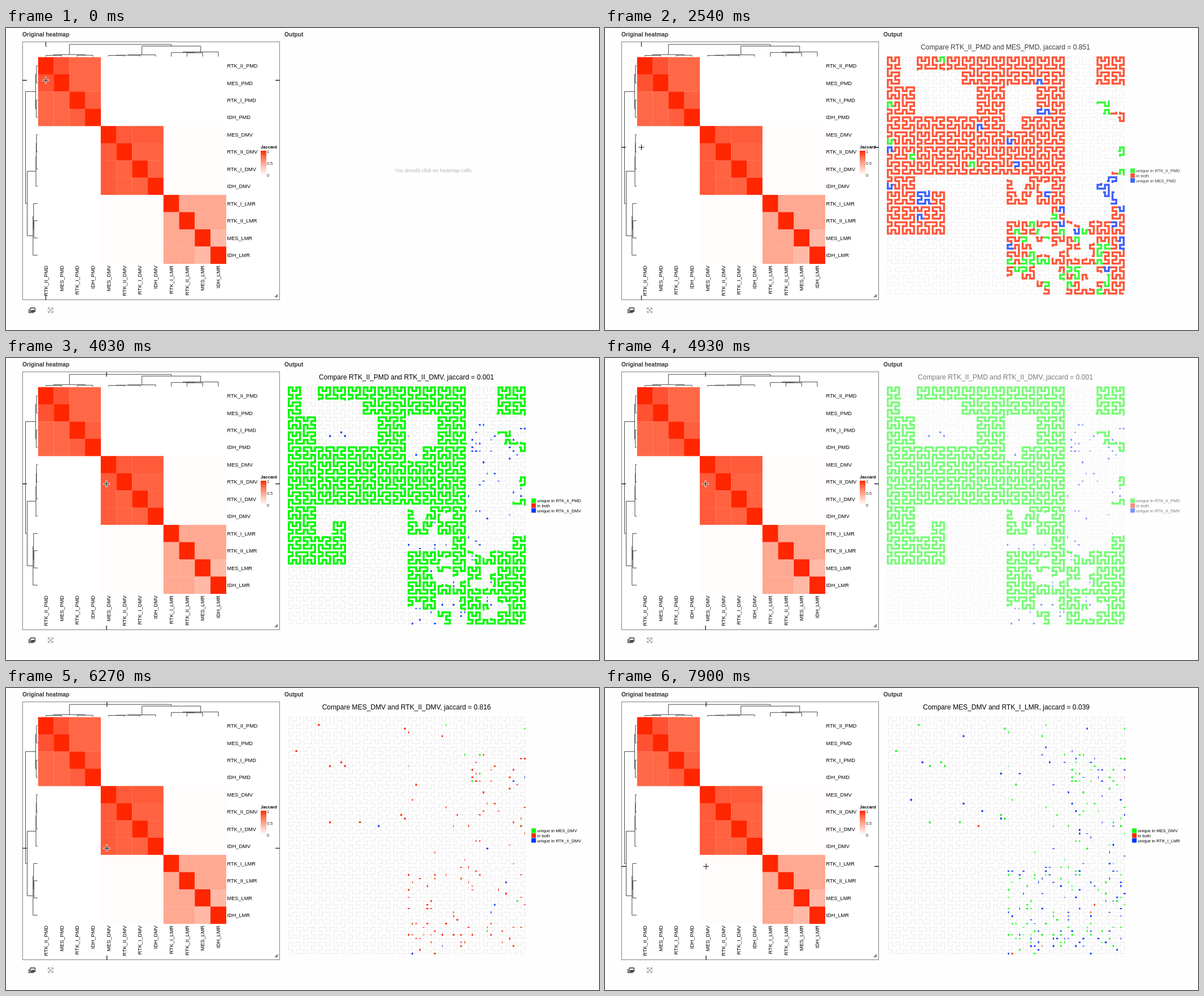
These frames come from a looping animation (1050x534 px, 8 s). An HTML page:

```html
<!DOCTYPE html>
<html lang="en">
<head>
<meta charset="utf-8">
<title>Heatmap and Hilbert curve</title>
<style>
  html, body { margin: 0; width: 100%; height: 100%; overflow: hidden; background: #fefefe; }
  svg { display: block; width: 1050px; height: 534px; }
  text { font-family: "Liberation Sans", Arial, Helvetica, sans-serif; }
</style>
</head>
<body>
<svg id="stage" viewBox="0 0 1050 534" xmlns="http://www.w3.org/2000/svg"></svg>
<script>
const RED = '#ff2600', GREEN = '#00f900', BLUE = '#0433ff';
const LOOP = 8000;
const stage = document.getElementById('stage');

function add(parent, tag, attrs, content) {
  const el = document.createElementNS('http://www.w3.org/2000/svg', tag);
  for (const k in attrs) el.setAttribute(k, attrs[k]);
  if (content !== undefined) el.textContent = content;
  parent.appendChild(el);
  return el;
}
const text = (parent, x, y, size, str, more) =>
  add(parent, 'text', { x, y, 'font-size': size, ...more }, str);
const rect = (parent, x, y, width, height, fill, more) =>
  add(parent, 'rect', { x, y, width, height, fill, ...more });
const line = (parent, d, stroke, width, more) =>
  add(parent, 'path', { d, fill: 'none', stroke, 'stroke-width': width, ...more });
const random = (n, seed) => {
  const v = Math.sin(n * 12.9898 + seed * 78.233) * 43758.5453;
  return v - Math.floor(v);
};

// ---- Heatmap panel ----
const X0 = 56.8, Y0 = 51.5, CW = 27.75, CH = 30.45;
const names = ['RTK_II_PMD', 'MES_PMD', 'RTK_I_PMD', 'IDH_PMD',
  'MES_DMV', 'RTK_II_DMV', 'RTK_I_DMV', 'IDH_DMV',
  'RTK_I_LMR', 'RTK_II_LMR', 'MES_LMR', 'IDH_LMR'];

function cellColor(i, j) {
  const bi = i >> 2, bj = j >> 2;
  if (i === j) return RED;
  if (bi !== bj) return bi && bj ? '#fffcfb' : null;
  const lo = Math.min(i, j) % 4, hi = Math.max(i, j) % 4;
  if (bi === 0) return hi === 1 ? '#ff5233' : lo === 2 ? '#ff5f3e' : '#ff6846';
  if (bi === 1) return lo === 0 ? '#ff5a39' : '#ff6341';
  return lo === 2 ? '#ffb9a6' : '#ffa892';
}

// A node is [left, right, height]; leaves are row numbers.
const tree = [
  [[0, 1, 2], [2, 3, 2.3], 3.5],
  [[[[4, 5, 2], 6, 2.4], 7, 3], [[8, [9, 10, 6.6], 7.2], 11, 8.2], 18.5],
  21.5
];
function branches(node, at, out) {
  if (typeof node === 'number') return { p: node, h: 0 };
  const a = branches(node[0], at, out), b = branches(node[1], at, out), h = node[2];
  out.push('M' + at(a.p, a.h) + 'L' + at(a.p, h) + 'L' + at(b.p, h) + 'L' + at(b.p, b.h));
  return { p: (a.p + b.p) / 2, h };
}
function dendrogram(at) {
  const out = [];
  branches(tree, at, out);
  line(stage, out.join(''), '#333', 0.9);
}

function drawHeatmap() {
  text(stage, 29, 15, 10.2, 'Original heatmap', { 'font-weight': 700, fill: '#333' });
  text(stage, 493, 15, 10.2, 'Output', { 'font-weight': 700, fill: '#333' });
  rect(stage, 29.5, 24.5, 455, 456, '#fff', { stroke: '#808080' });
  for (let i = 0; i < 12; i++)
    for (let j = 0; j < 12; j++) {
      const c = cellColor(i, j);
      if (c) rect(stage, X0 + j * CW, Y0 + i * CH, CW + 0.2, CH + 0.2, c);
    }
  names.forEach((name, i) => {
    text(stage, 391.5, Y0 + (i + 0.5) * CH + 3.4, 9.2, name);
    const x = X0 + (i + 0.5) * CW + 3.3;
    text(stage, x, 420, 9.2, name, { 'text-anchor': 'end', transform: `rotate(-90 ${x} 420)` });
  });
  dendrogram((p, h) => `${X0 + (p + 0.5) * CW} ${50.5 - h}`);
  dendrogram((p, h) => `${56 - h} ${Y0 + (p + 0.5) * CH}`);

  const grad = add(add(stage, 'defs', {}), 'linearGradient', { id: 'scale', x1: 0, y1: 0, x2: 0, y2: 1 });
  [RED, '#ff6e4d', '#ffa48d', '#ffd3c7', '#fff'].forEach((c, i) =>
    add(grad, 'stop', { offset: i / 4, 'stop-color': c }));
  text(stage, 451, 212.7, 7.6, 'Jaccard', { 'font-weight': 700 });
  rect(stage, 451, 217, 10, 43.5, 'url(#scale)');
  ['1', '0.5', '0'].forEach((s, i) => text(stage, 462, 221 + i * 21, 7.3, s, { fill: '#222' }));
}

function drawTools() {
  add(stage, 'path', { d: 'M481 470V476H475Z', fill: '#808080' });
  rect(stage, 43, 495, 8.5, 6.5, '#fff', { stroke: '#333', 'stroke-width': 1.3, rx: 0.8 });
  line(stage, 'M40.7 497V503.3H49.5', '#333', 1.3);
  add(stage, 'path', { d: 'M43.8 501L46 498L47.5 499.5L49 497.5L51 501Z', fill: '#333' });
  line(stage, 'M75.5 495.5L82.5 502.5M82.5 495.5L75.5 502.5M74.8 498V494.8H78M80 494.8H83.2V498' +
    'M83.2 500V503.2H80M78 503.2H74.8V500', '#888', 1);
}

// ---- Hilbert curve ----
const N = 64, STEP = 6.63, CX = 500.8, CY = 51.9;
function hilbert(d) {
  let x = 0, y = 0;
  for (let s = 1, t = d; s < N; s *= 2, t >>= 2) {
    const rx = 1 & (t >> 1), ry = 1 & (t ^ rx);
    if (!ry) {
      if (rx) { x = s - 1 - x; y = s - 1 - y; }
      [x, y] = [y, x];
    }
    x += s * rx;
    y += s * ry;
  }
  return [x, N - 1 - y];
}
const curve = Array.from({ length: N * N }, (_, d) => hilbert(d));
const pos = ([x, y]) => [CX + x * STEP, CY + y * STEP];
const guide = 'M' + curve.map(p => pos(p).map(v => v.toFixed(2)).join(' ')).join('L');

// Solid blocks in tiles of 4 x 4 points: column, row, width, height
const solid = [
  [0, 0, 1, 4], [1, 2, 1, 2], [2, 0, 6, 1], [5, 1, 3, 1], [6, 2, 2, 2], [0, 4, 8, 4],
  [8, 0, 4, 2], [10, 2, 2, 2], [9, 4, 3, 4], [8, 5, 1, 3], [14, 0, 2, 2],
  [0, 8, 2, 2], [0, 10, 4, 2], [3, 9, 1, 1], [15, 10, 1, 6]
];
const isSolid = (x, y) => solid.some(([c, r, w, h]) =>
  x >= c * 4 && x < (c + w) * 4 && y >= r * 4 && y < (r + h) * 4);

// Share of runs that are covered outside the solid blocks
function patchy(x, y) {
  if (x < 32) return 0;
  if (y < 32) return x >= 56 ? 0.12 : 0;
  if (y < 40) return x < 48 ? 0.7 : 0;
  if (y < 44) return x > 43 && x < 48 ? 0.7 : 0;
  return y < 60 ? 0.68 : 0.3;
}
const runOf = (d, seed) => random(Math.floor(d / 6), seed);

function firstColor(d) {
  const [x, y] = curve[d];
  return isSolid(x, y) || runOf(d, 3) < patchy(x, y) ? GREEN : null;
}
function compareColor(d) {
  const [x, y] = curve[d];
  const blueTile = (x >> 2) === 2 && (y >> 2) === 9;
  const blueZone = x > 55 && y > 31 && y < 40;
  if (blueTile || (blueZone && runOf(d, 7) < 0.35)) return BLUE;
  if (!firstColor(d)) return null;
  const short = random(d >> 2, 5), low = x > 31 && y > 39 && x < 60;
  if (short > 0.985) return BLUE;
  const share = low ? 0.36 : isSolid(x, y) ? 0.015 : y < 32 ? 0.8 : 0;
  return short < share ? GREEN : RED;
}

function drawRuns(g, colorOf) {
  const paths = {};
  const mid = (a, b) => { const p = pos(a), q = pos(b); return [(p[0] + q[0]) / 2, (p[1] + q[1]) / 2]; };
  let last = null;
  curve.forEach((p, d) => {
    const c = colorOf(d);
    if (c) {
      let s = paths[c] || '';
      if (c !== last) s += 'M' + mid(curve[Math.max(d - 1, 0)], p);
      paths[c] = s + 'L' + pos(p) + 'L' + mid(p, curve[Math.min(d + 1, N * N - 1)]);
    }
    last = c;
  });
  for (const c in paths) line(g, paths[c], c, 3.5);
}

// ---- Small regions: rare on the left, denser to the right and bottom ----
function density(x, y) {
  if (x < 32) return y < 32 ? 0.011 : 0;
  if (y < 32) return x < 48 ? 0.014 : y > 8 ? 0.085 : 0.01;
  if (y < 40) return x < 48 ? 0.015 : 0.06;
  return y < 56 ? 0.06 : 0.09;
}
const dmv = d => random(d, 21) < density(...curve[d]);
const lmr = d => random(d, 34) < density(...curve[d]) * (curve[d][1] > 40 ? 1.4 : 0.8);
const kind = d => random(d, 55);

function drawSpots(g, colorOf) {
  const paths = {};
  curve.forEach((p, d) => {
    const c = colorOf(d);
    if (!c) return;
    const [x, y] = pos(p), along = p[0] < 32 ? 3 : 0.9 + 2 * random(d, 8);
    const flat = random(d, 9) < 0.5, w = flat ? 3.3 : along, h = flat ? along : 3.3;
    paths[c] = (paths[c] || '') + `M${x - w / 2} ${y - h / 2}h${w}v${h}h${-w}z`;
  });
  for (const c in paths) add(g, 'path', { d: paths[c], fill: c });
}

// ---- Output plots ----
function makePlot(a, b, score, draw, dx = 0) {
  const g = add(stage, 'g', { visibility: 'hidden' });
  text(g, 709 + dx, 38.3, 12.07, `Compare ${a} and ${b}, jaccard = ${score}`, { 'text-anchor': 'middle' });
  const body = add(g, 'g', { transform: `translate(${dx} 0)` });
  line(body, guide, '#a4a4a4', 0.8, { 'stroke-dasharray': `1 ${STEP / 2 - 1}` });
  draw(body);
  [['unique in ' + a, GREEN], ['in both', RED], ['unique in ' + b, BLUE]].forEach(([label, c], i) => {
    rect(g, 930.3 + dx * 2, 248.3 + i * 8.6, 8, 8, c);
    text(g, 940.5 + dx * 2, 255.3 + i * 8.6, 7.6, label);
  });
  return g;
}

drawHeatmap();
drawTools();
const hint = text(stage, 757.5, 254.5, 9.1, 'You should click on heatmap cells.',
  { 'text-anchor': 'middle', fill: '#b4b4b4' });

// Each plot appears at once, then fades in steps while the next one loads.
const plots = [
  { from: 450, fade: 2540, g: makePlot('RTK_II_PMD', 'MES_PMD', '0.851', g => drawRuns(g, compareColor)) },
  { from: 2980, fade: 4780, g: makePlot('RTK_II_PMD', 'RTK_II_DMV', '0.001', g => {
    drawSpots(g, d => dmv(d) && BLUE);
    drawRuns(g, firstColor);
  }) },
  { from: 5230, fade: 7310, g: makePlot('MES_DMV', 'RTK_II_DMV', '0.816', g =>
    drawSpots(g, d => dmv(d) && (kind(d) < 0.07 ? GREEN : kind(d) > 0.93 ? BLUE : RED))) },
  { from: 7900, fade: LOOP, g: makePlot('MES_DMV', 'RTK_I_LMR', '0.039', g =>
    drawSpots(g, d => dmv(d) ? (kind(d) > 0.95 ? RED : GREEN) : lmr(d) && BLUE), 1.5) }
];
function opacityAt(plot, t) {
  if (t < plot.fade) return 1;
  return 0.77 - 0.25 * Math.min(2, Math.floor((t - plot.fade) / 147));
}

// ---- Pointer ----
const marks = line(stage, '', '#222', 1.3);
const pointer = add(stage, 'g', {});
line(pointer, 'M-6 0H6M0 -6V6', '#fff', 3.2, { opacity: 0.85 });
line(pointer, 'M-5 0H5M0 -5V5', '#111', 1.1);

const stops = [[70.5, 92.5], [64.5, 211], [178, 222.5], [179, 315.5]];
const moves = [
  { start: 750, end: 1490, steps: 6 },
  { start: 3430, end: 4030, steps: 5 },
  { start: 5830, end: 6420, steps: 5 }
];
function pointerAt(t) {
  let p = stops[0];
  moves.forEach(({ start, end, steps }, i) => {
    if (t < start) return;
    const gap = (end - start) / (steps - 1);
    const k = Math.min(steps, Math.floor((t - start) / gap + 0.001) + 1) / steps;
    const e = (1 - Math.cos(Math.PI * k)) / 2;
    p = stops[i].map((v, n) => v + (stops[i + 1][n] - v) * e);
  });
  return p;
}

function render(t) {
  const now = plots.filter(p => t >= p.from).pop();
  hint.setAttribute('visibility', now ? 'hidden' : 'visible');
  for (const p of plots) {
    p.g.setAttribute('visibility', p === now ? 'visible' : 'hidden');
    p.g.setAttribute('opacity', opacityAt(p, t));
  }
  const [x, y] = pointerAt(t);
  pointer.setAttribute('transform', `translate(${x} ${y})`);
  marks.setAttribute('d', `M29 ${y}H37M477 ${y}H485M${x} 25V33M${x} 473V481`);
}

const begin = performance.now();
function tick() {
  render((performance.now() - begin) % LOOP);
  requestAnimationFrame(tick);
}
tick();
</script>
</body>
</html>
```
